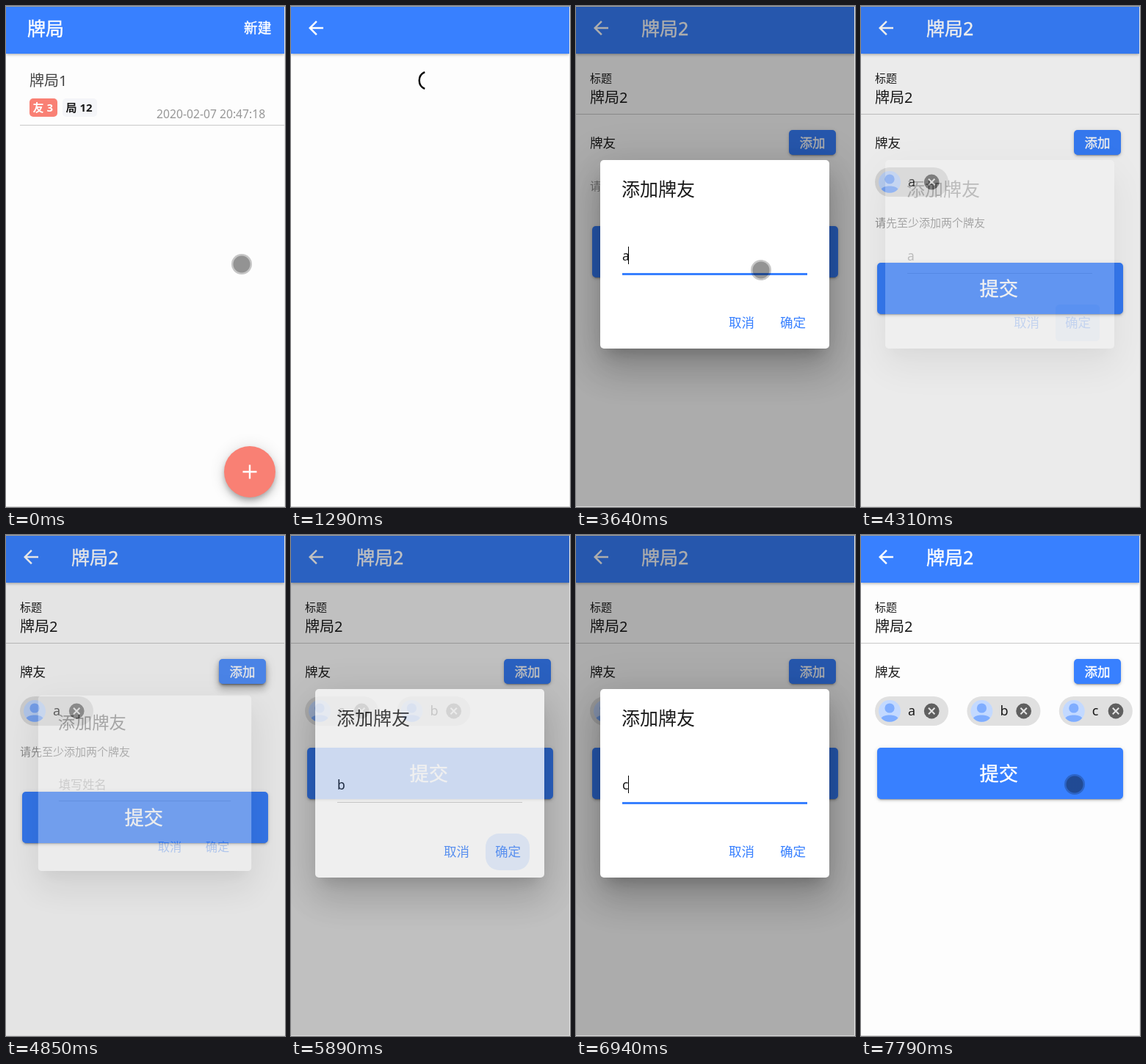
An HTML page for the animation above (8 s loop, 380x683 px).

```html
<!DOCTYPE html>
<html lang="zh-CN">
<head>
<meta charset="utf-8">
<title>牌局</title>
<style>
  html, body { margin: 0; width: 100%; height: 100%; overflow: hidden; background: #fdfdfd; }
  #stage { position: relative; width: 380px; height: 683px; overflow: hidden; background: #fdfdfd; }
  #stage div, svg { position: absolute; }
  .layer, svg { left: 0; top: 0; width: 380px; height: 683px; }
  .layer { background: #fdfdfd; }
  .clear { background: none; }
  svg { overflow: visible; }
  text { font-family: "Noto Sans", "Noto Sans CJK SC", "Noto Sans CJK", sans-serif; white-space: pre; fill: #1a1a1a; }
  .s15 { font-size: 15px; }
  .s17 { font-size: 17.5px; }
  .s20 { font-size: 20px; }
  .s25 { font-size: 25px; }
  .white { fill: #fff; }
  .blue { fill: #3880ff; }
  .gray { fill: #979797; }
  .bold { font-weight: 700; }
  .mid { stroke: #fff; stroke-width: .4px; }
  .bar { left: 0; top: 0; width: 379px; height: 65px; background: #3880ff; box-shadow: 0 1px 4px rgba(0,0,0,.35); }
  .rule { height: 1px; background: #c9c9c9; }
  .badge { top: 126px; height: 25px; border-radius: 5px; }
  .btn { border-radius: 5px; background: #3880ff;
    box-shadow: 0 4px 1px -3px rgba(0,0,0,.2), 0 2px 3px rgba(0,0,0,.14), 0 1px 6px rgba(0,0,0,.12); }
  #fab { left: 297px; top: 600px; width: 70px; height: 70px; border-radius: 50%; background: #f98074;
    box-shadow: 0 4px 6px -1px rgba(0,0,0,.2), 0 7px 12px rgba(0,0,0,.14), 0 1px 22px rgba(0,0,0,.12); }
  #add { left: 290px; top: 169px; width: 64px; height: 34px; }
  #press { left: 0; top: 0; width: 64px; height: 34px; border-radius: 5px; background: rgba(255,255,255,.13);
    box-shadow: 0 5px 5px -3px rgba(0,0,0,.2), 0 8px 10px 1px rgba(0,0,0,.14), 0 3px 14px 2px rgba(0,0,0,.12); }
  #submit { left: 22px; top: 0; width: 335px; height: 70px; }
  #backdrop { left: 0; top: 1px; width: 379px; height: 681px; background: rgba(0,0,0,.32); }
  #alert { transform-origin: 189px 338px; }
  #box { left: 33px; top: 210px; width: 312px; height: 257px; border-radius: 5px; background: #fff;
    box-shadow: 0 14px 19px -9px rgba(0,0,0,.2), 0 30px 48px 4px rgba(0,0,0,.14), 0 11px 58px 10px rgba(0,0,0,.12); }
  #focus { left: 63px; top: 364px; width: 252px; height: 3px; background: #3880ff; }
  #caret { top: 328px; width: 1px; height: 24px; background: #000; }
  #ripple { left: 265px; top: 407px; width: 60px; height: 50px; background: rgba(56,128,255,.15); }
  #touch { width: 28px; height: 28px; margin: -14px; border-radius: 50%;
    background: radial-gradient(circle, rgba(0,0,0,.42) 11px, rgba(0,0,0,.22) 12px); }
</style>
</head>
<body>
<div id="stage">
  <div class="layer">
    <div class="bar"></div>
    <div class="badge" style="left:32px;width:38px;background:#f98074"></div>
    <div class="badge" style="left:77px;width:47px;background:#f4f5f8"></div>
    <div class="rule" style="left:19px;top:162px;width:360px"></div>
    <div id="fab"></div>
    <svg>
      <text class="s25 white mid" x="29" y="40">牌局</text>
      <text class="white mid" x="324" y="37" font-size="18.75">新建</text>
      <text class="s20" x="32" y="108.5" style="fill:#444">牌局1</text>
      <text class="s15 bold white" x="36.5" y="144">友 3</text>
      <text class="s15 bold" x="81.5" y="144">局 12</text>
      <text class="gray" x="205" y="152.5" font-size="15.7">2020-02-07 20:47:18</text>
      <path d="M322.5 635h19M332 625.5v19" stroke="#fff" stroke-width="2.4"/>
    </svg>
  </div>

  <div class="layer" id="page">
    <div class="bar"></div>
    <svg>
      <path class="white" transform="translate(19 15) scale(1.25)" d="M20 11H7.83l5.59-5.59L12 4l-8 8 8 8 1.41-1.41L7.83 13H20z"/>
      <text class="s25 white mid" id="title" x="89" y="39.5">牌局2</text>
      <g id="spinner" style="transform-origin:187px 101.5px">
        <circle cx="187" cy="101.5" r="12.3" fill="none" stroke="#000" stroke-width="2.4"
          pathLength="360" stroke-dasharray="134 226" stroke-dashoffset="-113"/>
      </g>
    </svg>
    <div class="layer clear" id="content">
      <div class="rule" style="left:0;top:147px;width:379px"></div>
      <div class="btn" id="add"><div id="press"></div></div>
      <svg>
        <text class="s15" x="19" y="103.5">标题</text>
        <text class="s20" x="19" y="131.5">牌局2</text>
        <text class="s17" x="19" y="192.5">牌友</text>
        <text class="s17 white mid" x="304.5" y="192.5">添加</text>
        <text class="s15 gray" id="hint" x="19" y="250.5">请先至少添加两个牌友</text>
        <g id="chips"></g>
      </svg>
      <div class="btn" id="submit">
        <svg><text class="white mid" x="139.5" y="45" font-size="26.25">提交</text></svg>
      </div>
    </div>
  </div>

  <div id="backdrop"></div>
  <div class="layer clear" id="alert">
    <div id="box"></div>
    <div id="ripple"></div>
    <div class="rule" style="left:63px;top:364px;width:252px"></div>
    <div id="focus"></div>
    <svg>
      <text class="s25" x="62" y="258.5">添加牌友</text>
      <text class="s17 gray" id="prompt" x="63" y="346.5">填写姓名</text>
      <text class="s17" id="typed" x="63" y="347"></text>
      <text class="s17 blue" x="208" y="437.5">取消</text>
      <text class="s17 blue" x="278" y="437.5">确定</text>
    </svg>
    <div id="caret"></div>
  </div>

  <div id="touch"></div>
  <div style="left:0;top:0;width:380px;height:1px;background:#a9a18f"></div>
  <div style="left:379px;top:1px;width:1px;height:682px;background:#e6e6e6"></div>
  <div style="left:0;top:682px;width:380px;height:1px;background:#d9d9d9"></div>
</div>

<script>
const LOOP = 8000;
const TICK = 130;   // the screen refreshes at this pace after each cue
const BLINK = 520;
const cues = [0, 780, 1290, 2540, 3520, 4180, 4700, 5510, 5890, 6310, 6940, 7370, 7790];

// One friend is added per round: dialog opens, a letter is typed, dialog closes.
const rounds = [
  { name: 'a', open: 2540, type: 3520, close: 4193 },
  { name: 'b', open: 4790, type: 5510, close: 5854 },
  { name: 'c', open: 6270, type: 6940, close: 7310 }
];

const touches = [
  { x: 321, y: 352, at: 0, hold: 280 }, { x: 346, y: 38, at: 780 },
  { x: 236, y: 182, at: 1590 }, { x: 252, y: 360, at: 3520 },
  { x: 305, y: 193, at: 4700 }, { x: 291, y: 340, at: 7790, hold: 210 }
];

const $ = id => document.getElementById(id);
const ramp = (t, start, span) => Math.min(1, Math.max(0, (t - start) / span));
const easeOut = x => 1 - (1 - x) ** 3;
const shift = y => `translateY(${y}px)`;
const set = (id, opacity, more) => Object.assign($(id).style, { opacity: +opacity }, more);
const confirmed = (round, t) => t > round.close - 40;

$('chips').innerHTML = rounds.map(({ name }, i) => `
  <g id="chip-${name}" transform="translate(${19 + i * 125.4} 220)">
    <rect width="100" height="40" rx="20" fill="#e0e0e0"/>
    <circle cx="20" cy="20" r="15" fill="#c3d9ff"/>
    <circle cx="20" cy="16" r="6.6" fill="#7fadff"/>
    <path d="M8.5 29.5C12 24 28 24 31.5 29.5A15 15 0 0 1 8.5 29.5z" fill="#7fadff"/>
    <text x="45" y="26" font-size="18">${name}</text>
    <circle cx="77.2" cy="20" r="10.4" fill="#5f5f5f"/>
    <path d="M73 15.8l8.4 8.4m0-8.4l-8.4 8.4" stroke="#e4e4e4" stroke-width="2"/>
  </g>`).join('');

function snap(t) {
  const cue = cues.findLast(c => c <= t);
  return cue + Math.floor((t - cue) / TICK) * TICK;
}

function drawTouch(t) {
  const hit = touches.find(({ at, hold = 145 }) => t >= at && t < at + hold);
  set('touch', !!hit, hit && { left: hit.x + 'px', top: hit.y + 'px' });
}

function drawPage(t) {
  const enter = easeOut(ramp(t, 890, 280));
  set('page', enter, { transform: shift(40 * (1 - enter)) });
  set('spinner', t <= 1290, { transform: `rotate(${(t - 1290) * 360 / 750}deg)` });
  set('title', t > 1290);
  set('content', ramp(t, 1200, 600) * (t > 1290));
}

function drawForm(t) {
  const count = rounds.filter(r => confirmed(r, t)).length;
  rounds.forEach(({ name }, i) => set('chip-' + name, i < count));
  const chipRow = count > 0 ? 50 : 0;
  const hintRow = count < 2 ? 60 : 0;
  set('hint', hintRow > 0, { transform: shift(chipRow) });
  set('submit', 1, { transform: shift(240 + chipRow + hintRow) });
}

function drawDialog(t) {
  const round = rounds.findLast(r => t >= r.open) || rounds[0];
  const { name, open, type, close } = round;
  const done = confirmed(round, t);
  const typed = t >= type;
  const enter = ramp(t, open, TICK);
  const leave = ramp(t, close, 150);
  const focus = ramp(t, open + 280, 150);
  const blinkFrom = typed ? type : open + 430;
  const lit = Math.floor((t - blinkFrom) / BLINK) % 2 === 0;

  set('backdrop', enter * (1 - leave));
  set('alert', enter * (1 - leave), { transform: `scale(${.9 + .1 * enter})` });
  set('press', t >= open && 1 - focus);
  set('focus', done ? 0 : focus);
  set('caret', focus === 1 && !done && lit, { left: (typed ? 71 : 63) + 'px' });
  set('ripple', done, { borderRadius: 24 * (1 - leave) + 'px' });
  set('prompt', !typed);
  $('typed').textContent = typed ? name : '';
}

const start = performance.now();

function render() {
  const now = (performance.now() - start) % LOOP;
  const t = snap(now);
  drawTouch(now);
  drawPage(t);
  drawForm(t);
  drawDialog(t);
  requestAnimationFrame(render);
}

render();
</script>
</body>
</html>
```
